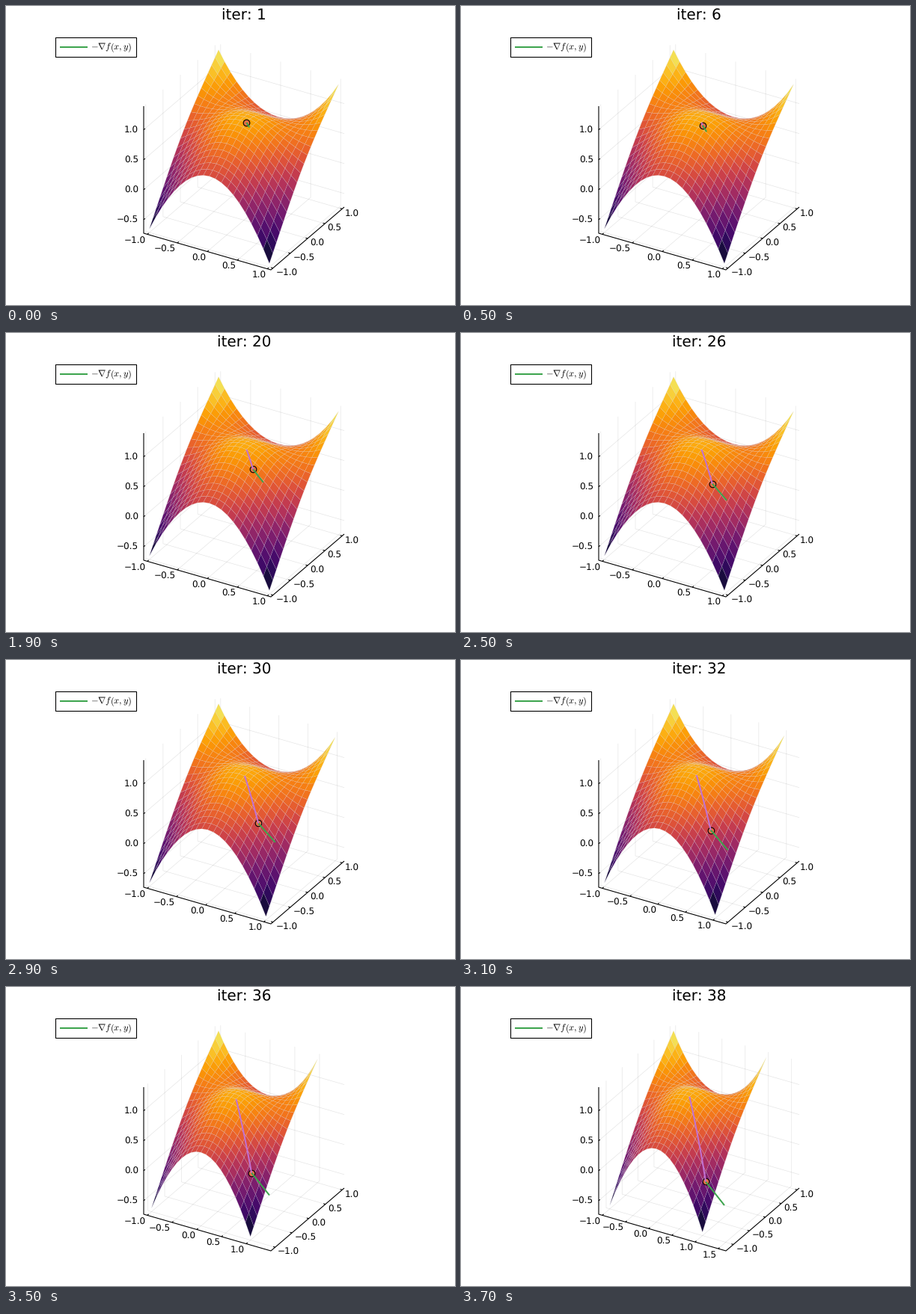
These frames come from a looping animation (600x400 px, 3.8 s). A matplotlib script:

```python
import numpy as np
import matplotlib
import matplotlib.pyplot as plt
from matplotlib.animation import FuncAnimation
from matplotlib.collections import LineCollection, PolyCollection

PX = 0.72  # points per pixel at 100 dpi
STEPS, RATE, ARROW = 38, 0.03, 0.5
N = 21
TICKS = np.arange(-4, 5) / 2

matplotlib.rcParams.update({
    "font.family": "DejaVu Sans", "mathtext.fontset": "cm",
    "text.hinting": "none", "text.hinting_factor": 1,
    "lines.solid_capstyle": "butt"})


def f(x, y):
    return 1 / (1 + x**2 + y**2) + x**2 * y


def descent(p):
    x, y = p
    d2 = (1 + x**2 + y**2) ** 2
    return np.array([2 * x / d2 - 2 * x * y, 2 * y / d2 - x**2])


path = [np.array([0.1, -0.1])]
for _ in range(STEPS - 1):
    path.append(path[-1] + RATE * descent(path[-1]))
path = np.array(path)


def widen(lo, hi):
    pad = 0.03 * (hi - lo)
    return lo - pad, hi + pad


ZLIM = widen(-2 / 3, 4 / 3)


def projector(xlim, ylim):
    def project(x, y, z):
        u = (x - xlim[0]) / (xlim[1] - xlim[0])
        v = (y - ylim[0]) / (ylim[1] - ylim[0])
        w = (z - ZLIM[0]) / (ZLIM[1] - ZLIM[0])
        return np.stack([184 + 170 * u + 98 * v,
                         304 + 49 * u - 84 * v - 170 * w], axis=-1)
    return project


# Quads ordered from the far side to the near side
grid = np.linspace(-1, 1, N)
gx, gy = np.meshgrid(grid, grid[::-1])
gz = f(gx, gy)


def quads(a):
    return np.stack([a[:-1, :-1], a[:-1, 1:], a[1:, 1:], a[1:, :-1]], axis=2)


level = (quads(gz).mean(axis=2).ravel() - ZLIM[0]) / (ZLIM[1] - ZLIM[0])

fig = plt.figure(figsize=(6, 4), dpi=100, facecolor="white")
ax = fig.add_axes([0, 0, 1, 1])
ax.set(xlim=(0, 600), ylim=(400, 0))
ax.axis("off")

grid_lines = ax.add_collection(LineCollection(
    [], colors=[(0, 0, 0, 0.1)], linewidths=0.7 * PX, zorder=1))
axis_lines = ax.add_collection(LineCollection(
    [], colors="black", linewidths=1.1 * PX, zorder=2))
surface = ax.add_collection(PolyCollection(
    [], facecolors=plt.get_cmap("inferno")(level),
    edgecolors=[(0.85, 0.85, 0.88, 0.3)], linewidths=0.5 * PX, zorder=3))
marker, = ax.plot([], [], "o", ms=8.6 * PX, mfc="#e26f46", mec="black",
                  mew=1.1 * PX, zorder=4)
arrow, = ax.plot([], [], color="#3da44d", lw=2 * PX, zorder=5)
trail, = ax.plot([], [], color="#c271d2", lw=2 * PX, zorder=6)
title = ax.text(318, 18, "", fontsize=20.4 * PX, ha="center", va="baseline")

ax.add_patch(plt.Rectangle((65.5, 41.5), 108, 26.5, fc="white", ec="black",
                           lw=1.1 * PX, zorder=7))
ax.plot([71.5, 109], [55, 55], color="#3da44d", lw=2 * PX, zorder=8)
ax.text(113, 59, r"$-\nabla f(x,y)$", fontsize=12.4 * PX, va="baseline", zorder=8)


def tick_labels(ha):
    return [ax.text(0, 0, f"{t:.1f}".replace("-", "\u2212"), ha=ha, va="baseline",
                    fontsize=11.7 * PX) for t in TICKS]


x_labels, y_labels, z_labels = (tick_labels(ha) for ha in ("right", "left", "right"))


def place(labels, lim, locate, dx, dy):
    for label, t in zip(labels, TICKS):
        inside = lim[0] <= t <= lim[1]
        label.set_visible(inside)
        if inside:
            label.set_position(locate(t) + [dx, dy])


def draw(i):
    x, y = path[i]
    z = f(x, y)
    tip = path[i] + ARROW * descent(path[i])
    xlim = widen(-1, max(1, tip[0]))
    ylim = widen(min(-1, tip[1]), 1)
    project = projector(xlim, ylim)
    (x0, x1), (y0, y1), (z0, z1) = xlim, ylim, ZLIM

    def line(*points):
        return np.array([project(*p) for p in points])

    def within(lim):
        return [t for t in TICKS if lim[0] <= t <= lim[1]]

    def tick(base, direction):
        start = project(*base)
        return np.array([start, start + direction])

    walls, axes = [], [line((x0, y0, z1), (x0, y0, z0), (x1, y0, z0), (x1, y1, z0))]
    for t in within(xlim):
        walls.append(line((t, y0, z0), (t, y1, z0), (t, y1, z1)))
        axes.append(tick((t, y0, z0), [1.8, -1.5]))
    for t in within(ylim):
        walls.append(line((x1, t, z0), (x0, t, z0), (x0, t, z1)))
        axes.append(tick((x1, t, z0), [-2.6, -0.75]))
    for t in within(ZLIM):
        walls.append(line((x0, y0, t), (x0, y1, t), (x1, y1, t)))
        axes.append(tick((x0, y0, t), [1.8, -1.5]))
    grid_lines.set_segments(walls)
    axis_lines.set_segments(axes)

    place(x_labels, xlim, lambda t: project(t, y0, z0), -1.8, 12)
    place(y_labels, ylim, lambda t: project(x1, t, z0), 3.5, 10)
    place(z_labels, ZLIM, lambda t: project(x0, y0, t), -7, 4.5)

    mesh = project(gx, gy, gz)
    corners = np.stack([quads(mesh[..., 0]), quads(mesh[..., 1])], axis=-1)
    surface.set_verts(corners.reshape(-1, 4, 2))

    marker.set_data(*project(x, y, z)[:, None])
    arrow.set_data(*line((x, y, z), (*tip, z)).T)
    done = path[:i + 1]
    trail.set_data(*project(done[:, 0], done[:, 1], f(done[:, 0], done[:, 1])).T)
    title.set_text(f"iter: {i + 1}")
    return []


anim = FuncAnimation(fig, draw, frames=STEPS, interval=100, repeat=True,
                     repeat_delay=0, blit=False)
plt.show()
```
